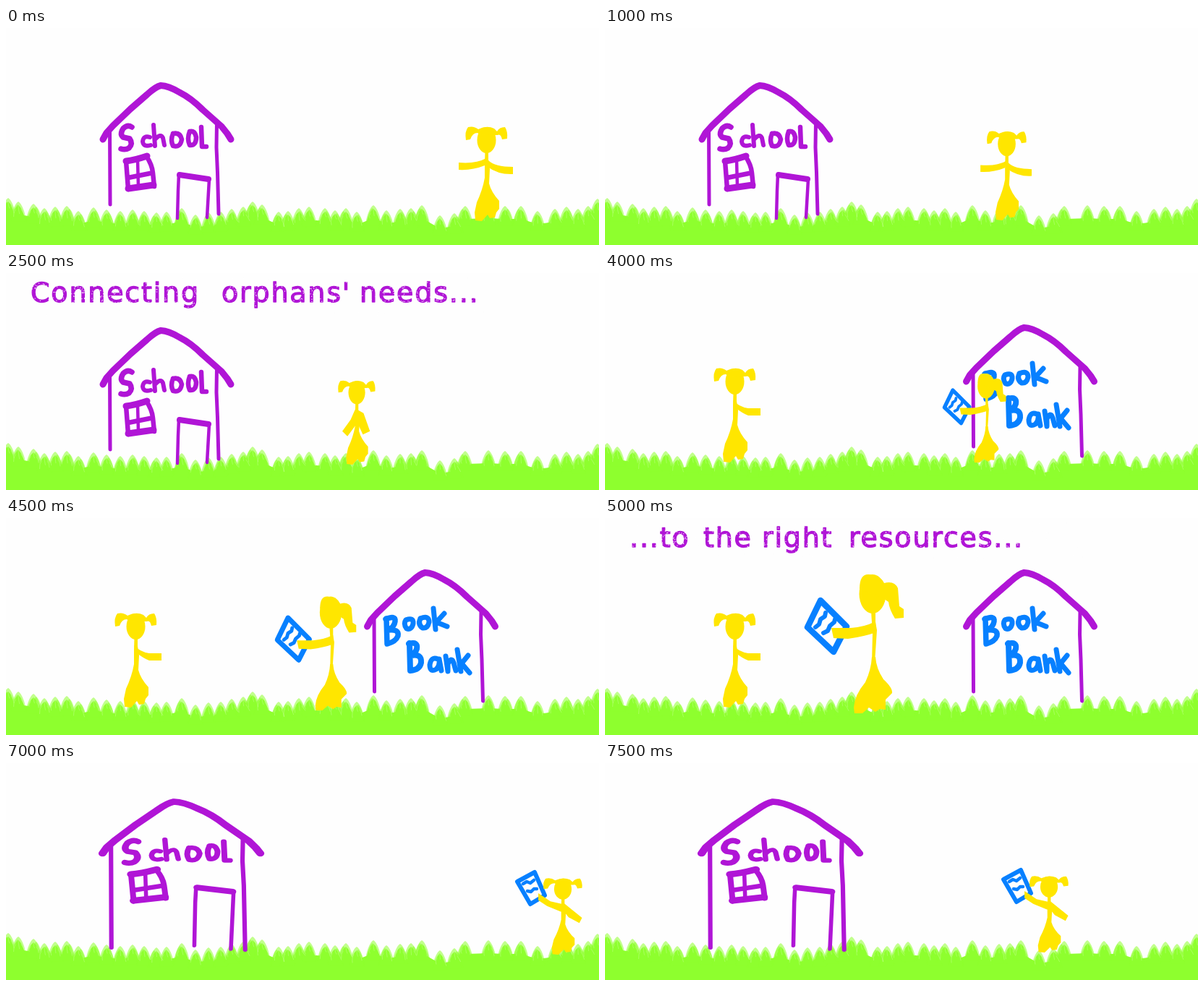
Animation of 820x300 px, one loop 8000 ms. Source, as an HTML page with a canvas:

```html
<!DOCTYPE html>
<html lang="en">
<head>
<meta charset="utf-8">
<title>School and book bank</title>
<style>
html, body { margin: 0; width: 100%; height: 100%; overflow: hidden; background: #fefefe; }
canvas { display: block; }
</style>
</head>
<body>
<canvas id="stage" width="820" height="300"></canvas>
<script>
const ctx = document.getElementById('stage').getContext('2d');
const PAPER = '#fefefe', PURPLE = '#b015d6', YELLOW = '#ffe600', BLUE = '#0780ff', GREEN = '#8eff2e';

function seeded(seed) {
  return () => (seed = (seed * 16807) % 2147483647) / 2147483647;
}

function placed(x, y, sx, sy, draw) {
  ctx.save();
  ctx.translate(x, y);
  ctx.scale(sx, sy);
  draw();
  ctx.restore();
}

function stroke(color, width, path) {
  ctx.strokeStyle = color;
  ctx.lineWidth = width;
  ctx.stroke(new Path2D(path));
}

function fill(color, path) {
  ctx.fillStyle = color;
  ctx.fill(new Path2D(path));
}

function oval(x, y, rx, ry, tilt = 0) {
  ctx.fillStyle = YELLOW;
  ctx.beginPath();
  ctx.ellipse(x, y, rx, ry, tilt, 0, 7);
  ctx.fill();
}

// ---- Grass: x, y of the blade tips ----
const TIPS = [
  3, 235, 17, 240, 38, 243, 53, 249, 68, 247, 84, 246, 100, 253, 121, 248, 139, 251, 158, 253,
  175, 251, 191, 253, 208, 255, 222, 254, 243, 249, 262, 258, 280, 255, 297, 254, 312, 250,
  328, 247, 341, 240, 354, 244, 377, 254, 390, 253, 405, 249, 419, 247, 441, 249, 455, 252,
  470, 249, 485, 254, 508, 245, 526, 252, 545, 250, 560, 249, 575, 245, 600, 259, 620, 256,
  635, 246, 667, 245, 690, 246, 712, 246, 735, 253, 759, 250, 775, 247, 791, 250, 805, 246, 818, 236];

function blade(x, y, half, depth) {
  ctx.beginPath();
  ctx.moveTo(x - half, y + depth);
  ctx.quadraticCurveTo(x - half * .6, y + 4, x, y);
  ctx.quadraticCurveTo(x + half * .6, y + 4, x + half, y + depth);
  ctx.fill();
}

function grass() {
  const rand = seeded(41);
  ctx.fillStyle = GREEN;
  ctx.beginPath();
  ctx.moveTo(0, 300);
  ctx.lineTo(0, 256);
  for (let i = 0; i < TIPS.length; i += 2) ctx.lineTo(TIPS[i], TIPS[i + 1] + 18);
  ctx.lineTo(820, 254);
  ctx.lineTo(820, 300);
  ctx.fill();
  for (let i = 0; i < TIPS.length; i += 2) {
    const x = TIPS[i], y = TIPS[i + 1];
    ctx.globalAlpha = .55;
    blade(x, y, 11, 25);
    blade(x + rand() * 8 - 4, y + 4, 9, 24);
    ctx.globalAlpha = 1;
    blade(x, y + 5, 10, 22);
  }
  ctx.globalAlpha = .22;
  for (let i = 0; i < TIPS.length; i += 2) {
    for (let k = -1; k < 2; k++) {
      const x = TIPS[i] + k * 4, y = TIPS[i + 1] + 6 + Math.abs(k) * 5;
      stroke('#fff', 1, `M${x} ${y} q${k * 3} 4 ${k * 3 + rand() * 2} ${6 + rand() * 5}`);
    }
  }
  ctx.globalAlpha = 1;
}

// ---- Buildings ----
function house(leftEnd, rightEnd) {
  stroke(PURPLE, 9, 'M134 154 L139 145 L148 135 L172 112 L195 92 Q207 81 214 79.5 Q225 80 240 89 Q256 97 272 113 L298 136 L306 146 L311 154');
  stroke(PURPLE, 5, `M143.5 138 L144 ${leftEnd - 2} M291.5 132 L291 165 L292.5 200 L294 ${rightEnd - 1}`);
}

function school(ends) {
  house(ends[0], ends[1]);
  stroke(PURPLE, 9, 'M166 184 Q177 183 195 177 M169 222 L204 217');
  stroke(PURPLE, 6.5, 'M166 184 L169 223 M194 177 Q202 189 203 200 L205 219 M169 207 L199 201');
  stroke(PURPLE, 4.5, `M182 182 L183 220 M239 202 L238 225 L237 ${ends[2]} M281 209 L278 ${ends[3]}`);
  stroke(PURPLE, 8, 'M240 203 L280 209');
  stroke(PURPLE, 7.5, 'M174 137 Q168 133 162 139 Q157 147 162 151 L171 153 Q176 160 170 166 Q165 169 159 167');
  stroke(PURPLE, 6, 'M199 151 Q190 148 189 157 Q190 165 200 162 M204 134 L206 163 M206 154 Q214 145 217 152 L219 162');
  stroke(PURPLE, 6.5, 'M231 146 Q227 155 231 163 Q241 166 243 154 Q241 144 231 146 M254 143 Q250 153 254 162 Q263 163 263 151 Q261 141 254 143 M270 137 L271 164 L277 164');
}

function bookBank() {
  placed(365.5, -4, 1, 1, () => house(246, 258));
  stroke(BLUE, 7.5, 'M526 139 L527 174 M525 140 Q539 134 538 143 Q537 151 528 155 Q544 153 542 163 Q539 171 527 174');
  stroke(BLUE, 7, 'M553 141 Q564 137 563 146 Q561 155 554 153 Q549 146 553 141 M573 139 Q585 134 585 144 Q583 153 576 152 Q569 147 573 139 M591 125 L594 154 M606 132 L595 144 L610 150');
  stroke(BLUE, 8, 'M558 173 L559 211 M557 174 Q570 170 568 181 Q566 187 560 190 Q575 187 574 200 Q572 210 559 211');
  stroke(BLUE, 7, 'M597 195 Q588 191 586 203 Q586 214 595 209 Q600 205 599 195 L602 211 M608 191 L611 212 L611 202 Q616 191 619 200 L622 211 M624 182 L629 212 M639 190 L630 201 L641 214');
}

// ---- Girl: origin between the feet ----
const ARMS = {
  wide: 'M-1 -87 Q-15 -79 -39 -81 L-39 -71 Q-20 -70 -3 -77Z M2 -84 Q11 -75 36 -75 L36 -65 Q16 -64 1 -75Z',
  tilted: 'M-1 -86 L-19 -76 L-34 -66 L-30 -56 L-15 -65 L-3 -75Z M2 -84 L18 -74 L34 -63 L29 -54 L15 -64 L2 -75Z',
  down: 'M-3 -86 L-10 -70 L-23 -52 L-15 -44 L-1 -63Z M1 -85 L5 -83 L10 -80 L20 -52 L9 -47 L0 -66Z',
  reach: 'M-3 -86 Q5 -77 18 -75 L35 -75 L35 -65 L18 -65 Q10 -68 0 -76Z',
  give: 'M-1 -86 Q16 -85 24 -91 L33 -97 L38 -89 Q28 -78 1 -77Z',
  carry: 'M-37 -105 L-19 -91 L0 -86 L-3 -73 L-24 -83 L-37 -93Z M1 -88 L15 -75 L28 -63 L24 -54 L8 -64 L-1 -77Z'
};

function girl(x, y, sx, sy, arms) {
  placed(x, y, sx, sy, () => {
    oval(-.5, -112, 13, 18);
    fill(YELLOW, 'M-10 -120 L-13 -122 Q-20 -122 -23 -113 L-29 -112 Q-31 -124 -26 -130 Q-18 -132 -12 -127 Q0 -133 10 -128 L14 -124 Q17 -130 25 -130 Q29 -124 28 -114 L21 -113 Q19 -121 15 -119 L10 -119Z');
    fill(YELLOW, 'M-2.5 -97 L2 -97 L2 -85 L4 -72 L3 -52 Q6 -40 17 -28 L17 -17 L13 -12 L11 -5 L4 -4 L1 -9 L-7 0 L-16 -1 L-17 -12 L-14 -26 Q-6 -43 -3 -60 L-3 -80Z');
    fill(YELLOW, ARMS[arms]);
  });
}

function girlWithBook(dx, dy) {
  placed(dx, dy, 1, 1, () => {
    stroke(BLUE, 6, 'M551 161 L575 148 L589 180 L569 192Z');
    stroke(BLUE, 4.5, 'M559 164 L564 161 L569 163 L574 159 M565 174 L570 175 L574 171 L578 171');
    girl(614.5, 262, .93, .81, 'carry');
  });
}

// ---- Helper: origin at the hem ----
function book() {
  stroke(BLUE, 8.5, 'M-72 -156 L-90 -119 L-54 -85 L-36 -120Z');
  stroke(BLUE, 6, 'M-79 -119 L-74 -123 L-72 -130 L-66 -134 L-65 -139 M-68 -111 L-62 -114 L-59 -121 L-53 -126 L-52 -130');
}

const DRESS = 'M-26 -8 L-25 0 L-14 0 L-5 -8 L4 -2 L10 -6 L18 -5 L18 -19 L27 -28 Q28 -35 15 -47 Q5 -62 4 -78 L-1 -78 Q-2 -60 -10 -43 Q-25 -25 -26 -8Z';

function helper(x, y, s) {
  placed(x, y, s, s, () => {
    book();
    oval(0, -165, 18.5, 27);
    fill(YELLOW, 'M-18 -172 Q-18 -193 -5 -192 Q11 -191 16 -180 Q30 -184 35 -173 L37 -148 L43 -144 L43 -132 L31 -131 Q23 -144 22 -154 L16 -158Z');
    fill(YELLOW, 'M-2 -141 L4 -141 L4 -126 L6 -115 L3 -70 L-1 -70 L0 -110Z');
    fill(YELLOW, DRESS);
    fill(YELLOW, 'M4 -127 Q-12 -119 -30 -118 L-57 -118 L-54 -104 L-34 -103 Q-12 -106 5 -112Z');
  });
}

function helperLeaning() {
  placed(313, 278, 1, 1, book);
  oval(311, 103, 18.5, 25, -.2);
  fill(YELLOW, 'M291 105 Q285 81 297 79 Q318 77 327 83 Q338 78 343 90 Q346 106 353 110 L360 112 L358 123 L347 125 Q334 112 330 102 L325 108Z');
  fill(YELLOW, 'M316 126 L321 124 L329 142 L331 160 L337 187 L331 196 L328 160 L325 146Z');
  placed(331, 264, .97, 1.03, () => fill(YELLOW, DRESS));
  fill(YELLOW, 'M326 138 Q310 150 296 156 L270 165 L274 179 Q296 175 309 168 L330 153Z');
}

// ---- Captions: words with their left edges ----
const NEEDS = [['Connecting', 34], ['orphans\'', 298], ['needs...', 489]];
const RESOURCES = [['...to', 34], ['the', 136], ['right', 217], ['resources...', 337]];

function caption(words) {
  const rand = seeded(97);
  ctx.font = '38px "DejaVu Sans", sans-serif';
  ctx.letterSpacing = '1.8px';
  ctx.fillStyle = ctx.strokeStyle = PURPLE;
  ctx.lineWidth = 1.3;
  for (const [word, x] of words) {
    ctx.fillText(word, x, 39.5);
    ctx.strokeText(word, x, 39.5);
  }
  // chalk grain
  ctx.fillStyle = PAPER;
  for (let i = 0; i < 1500; i++) ctx.fillRect(30 + rand() * 630, 6 + rand() * 52, 1.1, 1.1);
}

// ---- Scenes ----
function walk(x, y, scale, arms) {
  school([246, 258, 263, 262]);
  girl(x, y, scale, scale, arms);
}

function meeting(arms, drawHelper) {
  bookBank();
  girl(180, 262, 1, 1, arms);
  drawHelper();
}

function backToSchool(dx, dy) {
  placed(-31.8, -22.8, 1.233, .96, () => school([292, 294, 287, 292]));
  girlWithBook(dx, dy);
}

const SCENES = [
  [0, () => walk(665, 267, 1, 'wide')],
  [500, () => walk(610, 263, .975, 'tilted')],
  [1000, () => walk(556, 266, .945, 'wide')],
  [1500, () => walk(484, 266, .9, 'tilted')],
  [2000, () => walk(485.5, 265, .89, 'down')],
  [2500, () => { walk(485.5, 265, .89, 'down'); caption(NEEDS); }],
  [4000, () => meeting('reach', () => helper(527, 262, .64))],
  [4500, () => meeting('reach', () => helper(449, 266, .82))],
  [5000, () => { meeting('reach', () => helper(370, 270, 1)); caption(RESOURCES); }],
  [5500, () => { meeting('give', helperLeaning); caption(RESOURCES); }],
  [7000, () => backToSchool(156, 3)],
  [7500, () => backToSchool(0, 0)]
];

let shown = null;

function frame(now) {
  const time = now % 8000;
  const scene = SCENES.findLast(([start]) => start <= time);
  if (scene !== shown) {
    shown = scene;
    ctx.fillStyle = PAPER;
    ctx.fillRect(0, 0, 820, 300);
    ctx.lineCap = ctx.lineJoin = 'round';
    grass();
    scene[1]();
  }
  requestAnimationFrame(frame);
}
frame(0);
</script>
</body>
</html>
```
